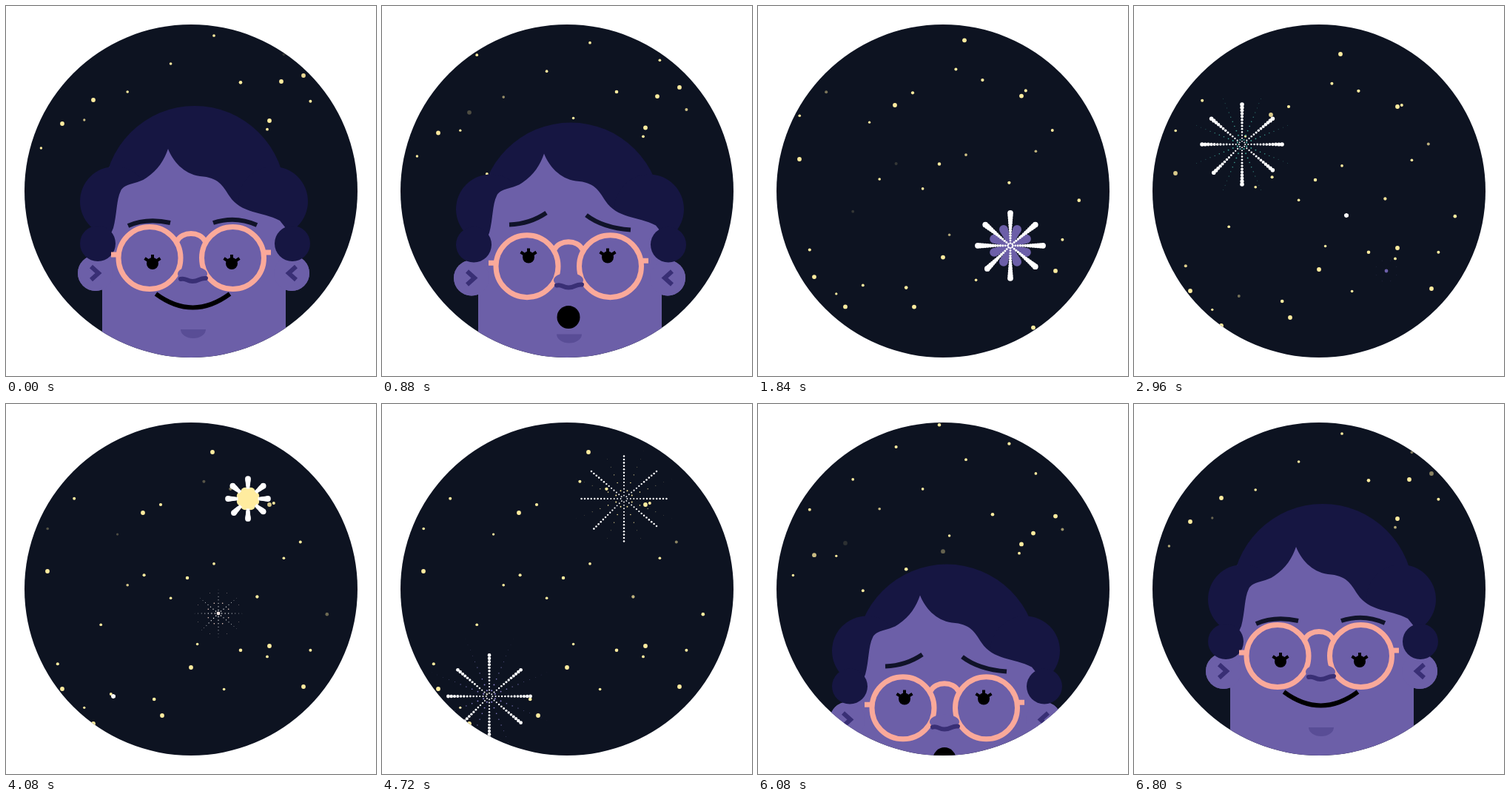
Animation, 500 px wide and 500 px high, one loop 6.88 s. Source, as an HTML page with a canvas:

```html
<!DOCTYPE html>
<html lang="en">
<head>
<meta charset="utf-8">
<title>Night sky</title>
<style>
html, body { margin: 0; width: 100%; height: 100%; overflow: hidden; background: #fff; }
canvas { display: block; width: 100vmin; height: 100vmin; }
</style>
</head>
<body>
<canvas id="c" width="500" height="500"></canvas>
<script>
const g = document.getElementById('c').getContext('2d');
const LOOP = 6880, TWINKLE = LOOP / 4, PAN = 408, TAU = Math.PI * 2;
const SKY = '#0d1321', STAR = '#ffec9f', HAIR = '#161642', SKIN = '#6c5fa8',
      FRAME = '#faa99a', BROW = '#101329', LINE = '#392f75', CHIN = '#594d96';

const clamp = v => Math.max(0, Math.min(1, v));
const lerp = (a, b, k) => a + (b - a) * k;
const smooth = v => v * v * (3 - 2 * v);
const ease = (t, start, span) => (1 - Math.cos(Math.PI * clamp((t - start) / span))) / 2;
const frac = v => v - Math.floor(v);

let seed = 7;
const random = () => (seed = (seed * 16807) % 2147483647) / 2147483647;

// The brightest stars are placed (x, y, parallax), the small ones are scattered evenly.
const bright = [
  [372, 102, 363], [118, 127, 305], [76, 159, 226], [356, 155, 172],
  [402, 94, 288], [356, -36, 172], [279, -158, 223], [56, -1, 227],
  [185, -8, 155], [211, 249, 172], [250, 160, 196]
];
const SMALL = 30;
const stars = bright.map(([x, y, depth]) => ({ x, y, depth, r: 2.9 }));
for (let i = 0; i < SMALL; i++) {
  stars.push({
    x: 45 + 400 * frac(0.32 + i * 0.618),
    y: lerp(-150, 230, i / SMALL),
    depth: lerp(120, 270, random()),
    r: lerp(1.6, 2.4, random())
  });
}
for (const s of stars) s.dim = random() * TWINKLE;

const bursts = [
  { x: 341, y: 358, start: 1510, color: SKIN, ember: SKIN },
  { x: 146, y: 187, start: 2385, color: '#3fa497', ember: '#fff' },
  { x: 287, y: 283, start: 2950, color: '#f6d5c8', ember: '#f2e6e2' },
  { x: 327, y: 128, start: 3932, color: STAR, ember: STAR },
  { x: 145, y: 395, start: 4070, color: '#8f86d6', ember: '#fff' }
];
const WHITE_RAYS = [0, 40, 90, 135, 180, 220, 270, 320];
const COLOR_RAYS = WHITE_RAYS.map((_, i) => 22.5 + 45 * i);

function disc(x, y, r, fill) {
  if (r <= 0.05) return;
  g.fillStyle = fill;
  g.beginPath();
  g.arc(x, y, r, 0, TAU);
  g.fill();
}

function stroke(color, width, draw, cap = 'butt') {
  g.strokeStyle = color;
  g.lineWidth = width;
  g.lineCap = cap;
  g.beginPath();
  draw();
  g.stroke();
}

function curve([x0, y0, x1, y1, x2, y2]) {
  g.moveTo(x0, y0);
  g.quadraticCurveTo(x1, y1, x2, y2);
}

function drawStars(t, pan) {
  for (const s of stars) {
    const d = frac((t - s.dim) / TWINKLE) * TWINKLE;
    g.globalAlpha = clamp(0.1 + Math.min(d, TWINKLE - d) / 200);
    disc(s.x, s.y + s.depth * pan, s.r, STAR);
  }
  g.globalAlpha = 1;
}

function rays(x, y, angles, count, length, size, fill) {
  for (const deg of angles) {
    const a = deg * TAU / 360, cx = Math.cos(a), cy = Math.sin(a);
    for (let i = 1; i <= count; i++) {
      const u = i / count;
      disc(x + cx * length * u, y - cy * length * u * -1, size(u), fill);
    }
  }
}

function burst(t, shift, b) {
  const a = (t - b.start) / 1000, x = b.x, y = b.y + shift;
  if (a < 0 || a > 1.65) return;

  // coloured petals that break up into fine sparks
  const reach = 20 * clamp(a / 0.3) + 128 * smooth(clamp((a - 0.25) / 0.8));
  const ball = lerp(6, 1.2, clamp((a - 0.33) / 0.2)) * clamp(a / 0.12);
  const spark = clamp((a - 0.4) / 0.15);
  g.globalAlpha = clamp((1.5 - a) / 0.3);
  rays(x, y, COLOR_RAYS, 10, reach, u =>
    ball * lerp(0.3 + 0.7 * u, 1 - 0.55 * u, spark) * clamp(1 - Math.max(0, a - 0.5) * 5 * u),
    b.color);
  g.globalAlpha = 1;

  // white spokes, thickest at the tip
  const length = 60 * (1 - Math.exp(-a / 0.25));
  const tip = lerp(3.9, 2.8, clamp((a - 0.33) / 0.246)) * clamp(a / 0.08);
  const fade = clamp((1.35 - a) / 0.25);
  rays(x, y, WHITE_RAYS, 13, length, u =>
    tip * (0.32 + 0.68 * u ** 1.4) * clamp(1 - Math.max(0, a - 0.6) * 2.9 * u) * fade, '#fff');

  disc(x, y, 13.6 * clamp(a / 0.12) * clamp((0.3 - a) / 0.1), b.color);
  if (a < 0.1) disc(x, y, 2.8, '#fff');
  if (a > 0.9) disc(x, y, 2.4 * clamp((1.65 - a) / 0.1), b.ember);
}

function face() {
  g.fillStyle = SKIN;
  g.beginPath();
  g.moveTo(130, 560);
  g.lineTo(130, 335);
  g.lineTo(145, 300);
  g.bezierCurveTo(150, 282, 149, 262, 155, 250);
  g.bezierCurveTo(160, 239, 178, 241, 190, 232);
  g.bezierCurveTo(205, 222, 214, 208, 219, 193);
  g.bezierCurveTo(225, 209, 240, 227, 262, 230);
  g.bezierCurveTo(288, 232, 292, 242, 302, 257);
  g.bezierCurveTo(318, 281, 345, 277, 370, 290);
  g.lineTo(378, 300);
  g.lineTo(378, 560);
  g.fill();
}

function ear(x, side) {
  disc(x, 361, 24, SKIN);
  stroke(LINE, 6, () => {
    g.moveTo(x + 6 * side, 352);
    g.lineTo(x - 4 * side, 361);
    g.lineTo(x + 6 * side, 370);
  });
}

function glasses(dx, dy) {
  g.save();
  g.translate(dx, dy);
  stroke(FRAME, 7, () => {
    for (const x of [194, 306.5]) {
      g.moveTo(x + 42, 340.5);
      g.arc(x, 340.5, 42, 0, TAU);
    }
    g.moveTo(142, 336);
    g.lineTo(152, 336);
    g.moveTo(348, 333);
    g.lineTo(358, 333);
    g.moveTo(231, 318);
    g.bezierCurveTo(238, 304, 262, 304, 269, 318);
  });
  g.restore();
}

function eye(x, y) {
  disc(x, y, 8, '#000');
  stroke('#000', 4, () => {
    for (const side of [-1, 0, 1]) {
      g.moveTo(x, y);
      g.lineTo(x + 10.5 * side, y - (side ? 7 : 12));
    }
  });
}

function nose(dy) {
  g.fillStyle = SKIN;
  g.beginPath();
  g.ellipse(252, 362 + dy, 20, 10, 0, 0, TAU);
  g.fill();
  stroke(LINE, 6, () => {
    g.moveTo(236, 369 + dy);
    g.bezierCurveTo(243, 367 + dy, 244, 372 + dy, 252, 372 + dy);
    g.bezierCurveTo(261, 372 + dy, 262, 367 + dy, 270, 368 + dy);
  }, 'round');
}

// The smile tightens, then opens into a round mouth.
function mouth(look) {
  const close = clamp(look * 2), open = clamp(look * 2 - 1);
  if (close < 1) {
    const w = lerp(50, 8, close), y = lerp(389, 396, close);
    stroke('#000', 6, () => curve([252.5 - w, y, 252.5, y + lerp(37, 6, close), 252.5 + w, y]));
  } else {
    disc(252, 398, lerp(6, 15.5, open), '#000');
  }
}

function head(drop, look) {
  const mix = (a, b) => a.map((v, i) => lerp(v, b[i], look));
  g.save();
  g.translate(0, drop);

  disc(255, 257.5, 122.5, HAIR);
  for (const x of [147, 361]) disc(x, 264 - 12 * look, 47, HAIR);

  g.save();
  g.translate(0, -16 * look);
  ear(121, -1);
  ear(386, 1);
  face();
  ear(121, -1);
  ear(386, 1);
  g.fillStyle = CHIN;
  g.beginPath();
  g.ellipse(253, 437, 17, 12, 0, 0, Math.PI);
  g.fill();
  g.restore();

  for (const x of [124, 387]) disc(x, 321 - 21 * look, 24, HAIR);

  stroke(BROW, 6, () => {
    curve(mix([165, 297, 190, 286, 222, 293], [172, 273, 200, 272, 222, 257]));
    curve(mix([280, 293, 310, 283, 339, 296], [276, 260, 298, 277, 336, 280]));
  });
  glasses(2 * look, -11.4 * look);
  for (const x of [198, 305]) eye(x, 348 - 31 * look);
  nose(-14 * look);
  mouth(look);
  g.restore();
}

function render(t) {
  const pan = ease(t, 662, 1450) - ease(t, 5059, 1450);
  const look = ease(t, 580, 290) - ease(t, 6100, 350);

  g.fillStyle = '#fff';
  g.fillRect(0, 0, 500, 500);
  g.save();
  g.beginPath();
  g.arc(250, 250, 225, 0, TAU);
  g.clip();
  g.fillStyle = SKY;
  g.fillRect(0, 0, 500, 500);
  drawStars(t, pan);
  for (const b of bursts) burst(t, PAN * (pan - 1), b);
  if (pan < 0.97) head(PAN * pan, look);
  g.restore();
}

const began = performance.now();
function tick() {
  render((performance.now() - began) % LOOP);
  requestAnimationFrame(tick);
}
tick();
</script>
</body>
</html>
```
